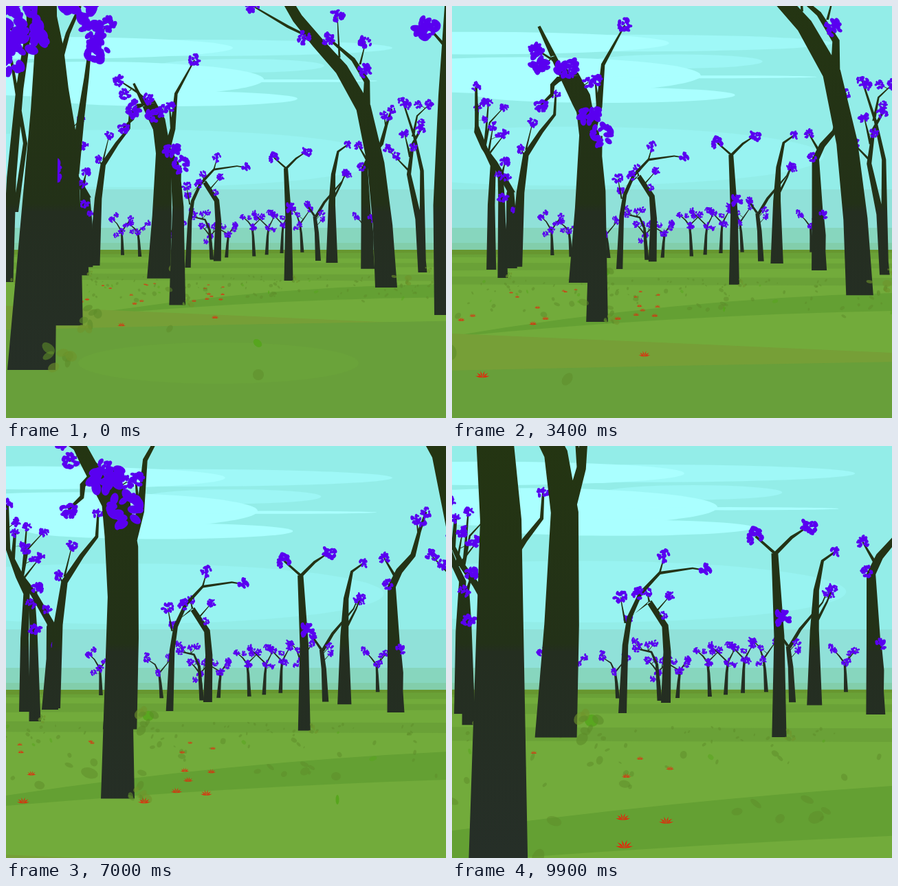
These frames come from a looping animation (640 by 600 pixels, 10000 ms). An HTML page with a canvas:

```html
<!DOCTYPE html>
<html lang="en">
<head>
<meta charset="utf-8">
<title>Forest walk</title>
<style>
html, body { margin: 0; width: 100%; height: 100%; overflow: hidden; background: #93ede8; }
canvas { display: block; }
</style>
</head>
<body>
<canvas id="stage" width="640" height="600"></canvas>
<script>
const ctx = document.getElementById('stage').getContext('2d');
const W = 640, H = 600, VX = 320, VY = 362, LOOP = 10000, STEP = 100;
const GROUND = 830; // depth times height below the eye line
const BLOOM = '#5900f0', RED = '#f01a08', LEAF = '#5d8c2a', DRY = '#6f942b', BRIGHT = '#55a51c';

// The view swings left, then back: a cubic through its two rest points
const pan = t => 0.145 * t * (t - 9.05) * (4.9 + 0.1 * t);

function rng(seed) {
  let s = (seed * 7919 + 13) | 0;
  return () => {
    s = (s + 0x6d2b79f5) | 0;
    let r = Math.imul(s ^ (s >>> 15), 1 | s);
    r = (r + Math.imul(r ^ (r >>> 7), 61 | r)) ^ r;
    return ((r ^ (r >>> 14)) >>> 0) / 4294967296;
  };
}

// Maps coordinates seen at time `ref` to the view at time `t`, for depth z
function project(z, ref, t) {
  const k = (z - ref) / (z - t);
  ctx.setTransform(k, 0, 0, k, VX + pan(t) - (VX + pan(ref)) * k, VY - VY * k);
}

function paint(fill) {
  ctx.setTransform(1, 0, 0, 1, 0, 0);
  ctx.fillStyle = fill;
  ctx.fill();
}

function oval(x, y, rx, ry, turn = 0) {
  ctx.moveTo(x + rx * Math.cos(turn), y + rx * Math.sin(turn));
  ctx.ellipse(x, y, rx, ry, turn, 0, 7);
}

function disc(z, ref, t, x, y, rx, ry, color) {
  project(z, ref, t);
  ctx.beginPath();
  oval(x, y, rx, ry);
  paint(color);
}

// ---- sky ----
const skyBands = [[0, '#93ede8'], [267, '#90e1d9'], [323, '#87d6be'], [345, '#82ceab']];

// x, y, half width, half height, colour
const clouds = [
  [190, 222, 360, 42, '#98f3f1'], [270, 61, 292, 12, '#9ff8f7'], [342, 87, 121, 10, '#9df6f5'],
  [60, 61, 270, 16, '#aaffff'], [120, 107, 255, 26, '#aaffff'], [240, 135, 184, 11, '#aaffff'],
  [390, 109, 150, 2, '#aaffff']
];

function drawSky(t) {
  skyBands.forEach(([y, c]) => {
    ctx.fillStyle = c;
    ctx.fillRect(0, y, W, H - y);
  });
  clouds.forEach(c => disc(151, 0, t, ...c));
}

// ---- ground: depth, colour, edge height at left, control point and right ----
const hills = [];
for (let i = 0; i < 7; i++) {
  const y = 355 + 5.2 * i + 0.37 * i * i, tilt = i ? 2 * Math.sin(i * 2) : 0;
  const color = i === 0 ? '#67962f' : i % 2 ? '#6aa137' : '#72ab3b';
  hills.push([22 + 400 * (1 - i / 6) ** 3, color, y + tilt, y, y - tilt]);
}
hills.push(
  [16, '#64a033', 482, 402, 405],
  [14.8, '#72ab3b', 470, 424, 424],
  [10.9, '#769f37', 434, 450, 467],
  [9.2, '#689f3a', 473, 463, 458]
);

function drawHill([z, color, left, mid, right], t) {
  if (z - t < 0.2) return;
  project(z, 0, t);
  ctx.beginPath();
  ctx.moveTo(-60, 700);
  ctx.lineTo(-60, left);
  ctx.quadraticCurveTo(320, mid, 700, right);
  ctx.lineTo(700, 700);
  paint(color);
}

// ---- trees ----
const bark = ctx.createLinearGradient(0, 0, 0, H);
bark.addColorStop(0, '#243512');
bark.addColorStop(0.48, '#233118');
bark.addColorStop(0.5, '#242e20');
bark.addColorStop(1, '#262f28');

const things = [];

// Turns [start width, end width, x, y, x, y, ...] into joints with even taper
function grow([w0, w1, ...p]) {
  const joints = [];
  let len = 0;
  for (let i = 0; i < p.length; i += 2) {
    if (i) len += Math.hypot(p[i] - p[i - 2], p[i + 1] - p[i - 1]);
    joints.push({ x: p[i], y: p[i + 1], len });
  }
  joints.forEach(j => { j.w = w0 + (w1 - w0) * j.len / len; });
  return joints;
}

function limb(joints) {
  const right = [];
  joints.forEach((j, i) => {
    const a = joints[Math.max(0, i - 1)], b = joints[Math.min(joints.length - 1, i + 1)];
    const dx = b.x - a.x, dy = b.y - a.y, h = j.w / 2 / Math.hypot(dx, dy);
    const nx = i ? dy * h : -j.w / 2, ny = i ? dx * h : 0;
    if (i) ctx.lineTo(j.x + nx, j.y - ny); else ctx.moveTo(j.x + nx, j.y);
    right.unshift([j.x - nx, j.y + ny]);
  });
  right.forEach(p => ctx.lineTo(...p));
  ctx.closePath();
}

function cluster(x, y, r, rand) {
  return Array.from({ length: 18 }, () => {
    const a = rand() * 6.28, d = Math.sqrt(rand()) * r * 0.85, size = r * (0.24 + rand() * 0.16);
    return [x + Math.cos(a) * d, y + Math.sin(a) * d, size, size * 0.65, rand() * 3];
  });
}

// Every limb ends in a bloom; `sprigs` more sprout along the upper limbs
function tree(z, ref, sprigs, ...shapes) {
  const rand = rng(Math.round(z * 10) + shapes[0][2]);
  const limbs = shapes.map(grow), petals = [];
  const r = (2.5 + 150 / z) * z / (z - ref);
  limbs.forEach(l => {
    const tip = l[l.length - 1];
    if (tip.w < 5) petals.push(...cluster(tip.x, tip.y, r, rand));
  });
  const hosts = limbs.slice();
  for (let i = 0; i < sprigs; i++) {
    const l = hosts[i % hosts.length], n = l.length - 1;
    const a = l[n - 1], b = l[n], u = 0.2 + rand() * 0.7;
    const x = a.x + (b.x - a.x) * u, y = a.y + (b.y - a.y) * u;
    const ex = x + (rand() - 0.5) * 3.5 * r, ey = y - rand() * 2 * r;
    limbs.push(grow([r * 0.2, r * 0.1, x, y, ex, ey]));
    petals.push(...cluster(ex, ey, r * 0.85, rand));
  }
  things.push({ z, draw(t) {
    ctx.beginPath();
    project(z, ref, t);
    limbs.forEach(limb);
    paint(bark);
    ctx.beginPath();
    project(z, ref, t);
    petals.forEach(p => oval(...p));
    paint(BLOOM);
  } });
  const foot = limbs[0][0];
  if (z < 32) tuft(z, ref, foot.x + foot.w * 0.6, foot.y - foot.w * 0.2, foot.w * 0.35);
}

// far row: forked saplings
[147, 179, 241, 302, 328, 375, 398, 423, 457, 573].forEach((x, i) => {
  const rand = rng(i + 5), y = 363 + 5 * Math.sin(i * 0.55), lean = (rand() - 0.5) * 8;
  const fork = y - 38 - rand() * 12, top = fork - 14 - rand() * 12;
  tree(60 + i % 3 * 4, 9.9, 3,
    [6, 3, x, y, x + lean / 2, fork + 15, x + lean, fork],
    [3, 1, x + lean, fork, x - 10, top + 8, x - 16 - rand() * 10, top],
    [3, 1, x + lean, fork, x + 14, top]);
});

// middle distance
tree(46, 9.9, 1, [14, 8, 311, 374, 313, 300, 310, 262, 287, 227], [4, 1, 287, 227, 256, 252],
  [3, 1, 287, 227, 284, 214], [3, 1, 298, 240, 317, 218]);
tree(55, 9.9, 4, [7, 2, 302, 371, 298, 318, 290, 300, 268, 295]);
tree(49, 0, 4, [8, 5, 454, 371, 452, 330, 449, 306], [4, 2, 449, 306, 438, 290],
  [5, 1, 450, 308, 463, 286, 489, 255, 494, 243]);
tree(43, 0, 0, [17, 2, 474, 374, 474, 290, 476, 245, 483, 212, 497, 202], [4, 1, 474, 285, 488, 258, 494, 243]);
tree(42, 7, 2, [24, 12, 64, 384, 67, 310, 65, 262], [12, 4, 67, 262, 40, 215, 22, 190, 10, 165, 13, 127],
  [4, 1, 24, 190, 32, 150, 55, 125], [4, 2, 24, 190, 30, 118], [8, 2, 64, 270, 60, 237]);
tree(35, 7, 0, [20, 3, 69, 382, 76, 260, 85, 198, 110, 160, 132, 132, 134, 98], [4, 1, 85, 205, 77, 188],
  [3, 1, 85, 190, 96, 145]);
tree(34, 7, 2, [16, 4, 27, 387, 27, 280, 30, 215, 18, 190, 3, 150, 2, 85], [4, 1, 22, 195, 30, 150],
  [4, 1, 24, 195, 49, 163]);
tree(31, 7, 1, [17, 9, 42, 401, 40, 270, 38, 225], [4, 1, 41, 280, 43, 268], [5, 1, 40, 230, 46, 207]);
tree(33, 9.9, 0, [12, 2, 248, 389, 252, 290, 258, 250, 274, 215, 302, 185, 350, 178, 368, 181],
  [3, 1, 302, 185, 309, 160], [3, 1, 277, 215, 269, 214], [3, 1, 252, 258, 245, 220]);
tree(34.5, 7, 1, [25, 3, 567, 388, 564, 290, 561, 205, 572, 182, 592, 159, 601, 125, 611, 96],
  [5, 2, 566, 190, 550, 163], [4, 1, 562, 212, 556, 201], [3, 1, 600, 130, 597, 107], [8, 1, 573, 386, 576, 330, 574, 296]);
tree(25.5, 0, 0, [13, 6, 411, 400, 411, 310, 407, 236], [4, 2, 407, 236, 390, 221],
  [5, 1, 407, 237, 422, 222, 437, 212], [3, 1, 410, 310, 414, 293]);
tree(29, 0, 5, [13, 3, 606, 388, 600, 310, 586, 245, 592, 200, 603, 180],
  [10, 2, 606, 380, 605, 240, 594, 190, 577, 138], [4, 1, 592, 190, 598, 160, 616, 143],
  [4, 1, 586, 240, 556, 209], [4, 1, 588, 220, 580, 187]);
tree(22.3, 4.7, 1, [43, 22, 180, 406, 186, 290, 189, 175, 180, 115, 163, 82],
  [12, 3, 168, 82, 142, 88, 133, 97, 132, 112, 115, 128], [12, 2, 195, 170, 206, 130, 212, 65, 246, 3],
  [6, 2, 178, 95, 140, 62, 106, 40], [5, 2, 204, 130, 200, 90], [4, 2, 180, 110, 160, 76], [4, 2, 130, 57, 116, 67]);
tree(17.9, 0, 1, [32, 14, 553, 410, 548, 320, 538, 230, 520, 148, 488, 92, 453, 53, 424, 18, 405, -14],
  [12, 3, 524, 160, 525, 110, 505, 78, 470, 48], [6, 2, 455, 52, 410, 30, 359, 0], [3, 1, 485, 75, 482, 15],
  [3, 1, 515, 85, 523, 53], [4, 2, 526, 125, 522, 94], [4, 2, 460, 60, 433, 46]);

// close to the path
tree(13.6, 8.7, 0, [66, 36, 121, 566, 123, 300, 124, 170, 115, 50, 108, -10], [36, 9, 108, -8, 59, -100, 0, -215, -55, -330],
  [14, 4, 125, 40, 100, -60], [12, 4, 130, 70, 135, 2], [8, 3, 40, -140, 30, -200], [8, 3, -10, -240, -50, -225]);
tree(8.6, 1.5, 2, [57, 18, 31, 487, 34, 290, 32, 160, 20, 70, 14, 0, 0, -80],
  [18, 4, 44, 220, 56, 120, 66, 50, 75, -30], [8, 3, 8, 300, 2, 215], [5, 3, 74, -20, 84, 2]);
tree(8, 0, 0, [30, 16, 638, 450, 634, 290, 639, 130, 646, 0], [6, 3, 640, 60, 612, 28]);
tree(7, 0, 1, [17, 8, 2, 402, 8, 250, 20, 120, 38, 0], [8, 4, 14, 300, 28, 200, 8, 80]);
tree(5, 0, 0, [70, 23, 37, 530, 49, 290, 56, 150, 60, 0, 60, -60], [10, 5, 50, 60, 25, 42, 0, 28],
  [10, 4, 70, 110, 90, 40, 108, 0], [6, 4, 40, 55, 30, 45]);

// ---- undergrowth ----
function leaf(z, ref, x, y, rx, ry, turn, color = LEAF, alpha = 0.5) {
  things.push({ z, draw(t) {
    project(z, ref, t);
    ctx.beginPath();
    oval(x, y, rx, ry, turn);
    ctx.globalAlpha = alpha;
    paint(color);
    ctx.globalAlpha = 1;
  } });
}

function tuft(z, ref, x, y, r) {
  const rand = rng(Math.round(x * 3 + y));
  for (let i = 0; i < 7; i++) {
    const size = r * (0.25 + rand() * 0.25);
    leaf(z - 0.02, ref, x + (rand() - 0.4) * 2 * r, y + (rand() - 0.5) * 2 * r,
      size, size * (0.45 + rand() * 0.4), rand() * 3, rand() < 0.5 ? LEAF : DRY, 0.6);
  }
}

leaf(5.35, 0, 366, 491, 7, 5, 0.7, BRIGHT, 0.9);
leaf(4.7, 0, 367, 537, 8, 8, 0);
leaf(8.4, 0, 238, 470, 6, 4, 2.2);
leaf(11.3, 7, 480, 481, 7, 6, 0);
leaf(10.9, 7, 482, 515, 7, 2.5, 1.57, BRIGHT, 0.9);
leaf(22.8, 9.9, 203, 400, 10, 9, 0, BRIGHT, 0.85);
leaf(12.6, 8.7, 49, 526, 18, 11, 0.3);

const scatter = rng(41);
for (let i = 0; i < 120; i++) {
  const z = 13 + scatter() * 16, s = GROUND / z, r = s * (0.025 + scatter() * 0.045);
  leaf(z, 0, 90 + scatter() * 560, VY + s + scatter() * 8, r, r * (0.4 + scatter() * 0.5),
    scatter() * 3, scatter() < 0.12 ? BRIGHT : LEAF);
}

function flower(x, y, ref) {
  const z = ref + GROUND / (y - VY), r = (y - VY) * 0.058;
  things.push({ z, draw(t) {
    project(z, ref, t);
    ctx.beginPath();
    for (let i = 0; i < 6; i++) {
      const a = Math.PI * (1 + i / 5), c = Math.cos(a), s = Math.sin(a) * 0.75 - 0.1, w = r * 0.09;
      ctx.moveTo(x, y + r * 0.4);
      ctx.lineTo(x + c * r / 2 - s * w, y + r * (0.3 + s / 2) + c * w);
      ctx.lineTo(x + c * r, y + r * (0.25 + s));
      ctx.lineTo(x + c * r / 2 + s * w, y + r * (0.3 + s / 2) - c * w);
    }
    paint(RED);
  } });
}

[[168, 464], [304, 453], [118, 427], [187, 433]].forEach(p => flower(...p, 0));
[[25, 517], [37, 477], [123, 430], [201, 517], [260, 472], [265, 486], [301, 440], [248, 502]].forEach(p => flower(...p, 7));
for (let i = 0; i < 9; i++) flower(100 + scatter() * 220, 396 + scatter() * 40, 0);

things.sort((a, b) => b.z - a.z);

function frame(now) {
  const t = Math.floor((now % LOOP) / STEP) * STEP / 1000;
  ctx.setTransform(1, 0, 0, 1, 0, 0);
  drawSky(t);
  hills.forEach(h => drawHill(h, t));
  if (t < 6.5) disc(7.06, 0, t, 309, 520, 204, 30, '#6aa33a');
  things.forEach(o => { if (o.z - t > 0.35) o.draw(t); });
  requestAnimationFrame(frame);
}
requestAnimationFrame(frame);
</script>
</body>
</html>
```
